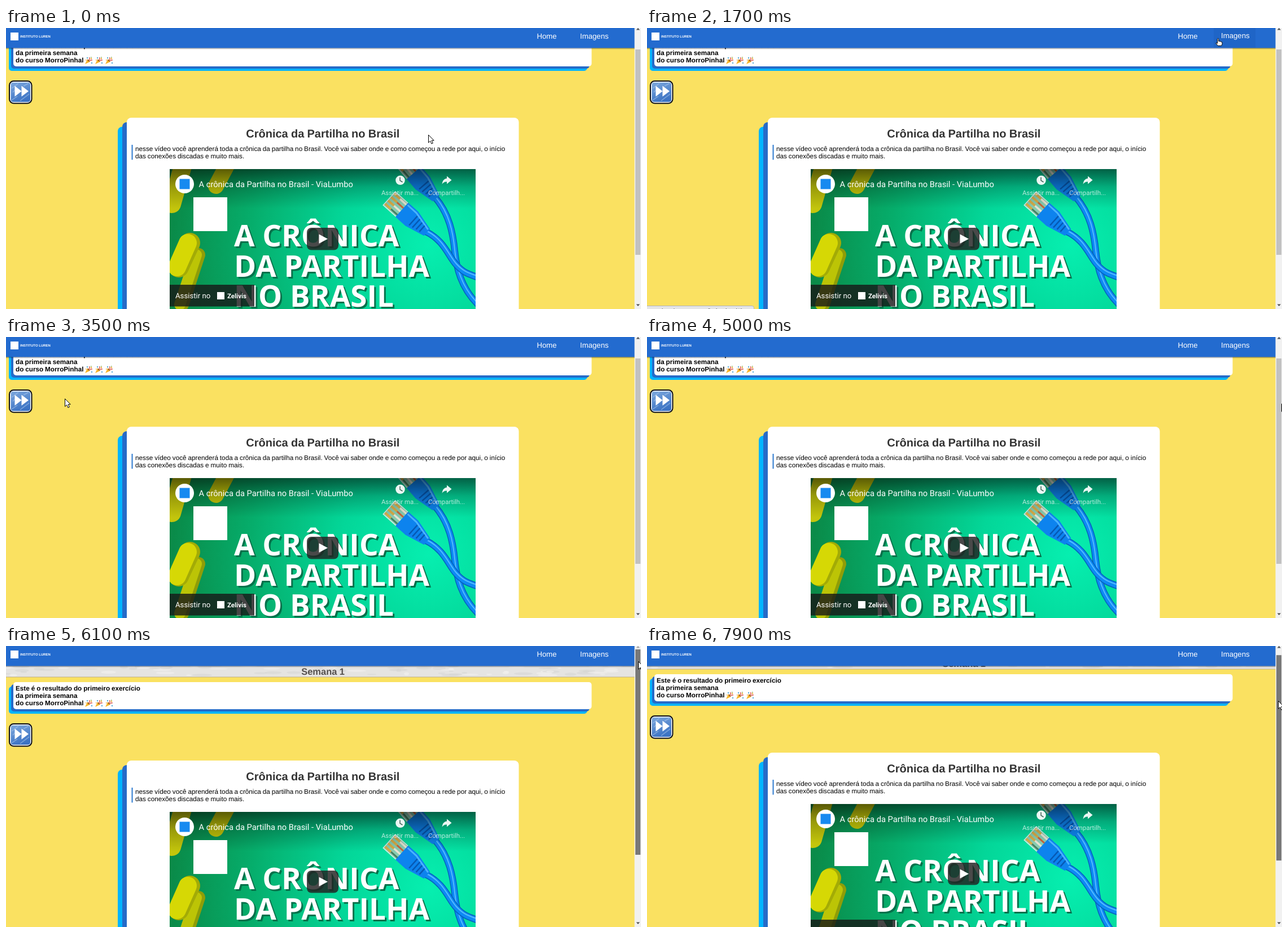
Recreate the animation shown at these times as an HTML page. Size 1125 by 498 pixels, loop 8 s.

```html
<!DOCTYPE html>
<html lang="pt-BR">
<head>
<meta charset="utf-8">
<title>Semana 1</title>
<style>
  html, body { margin: 0; width: 100%; height: 100%; overflow: hidden; }
  svg { display: block; width: 1125px; height: 498px; }
  text { text-rendering: geometricPrecision; font-family: "Liberation Sans", Arial, sans-serif; font-size: 11.72px; word-spacing: -.32px; white-space: pre; }
  .b { font-weight: 700; }
  .mid { text-anchor: middle; }
  .nav { font-size: 13.2px; fill: #fff; }
  .yt { font-family: Roboto, sans-serif; fill: #fff; word-spacing: 0; }
  .big { font: 700 53px "Open Sans", "Noto Sans", sans-serif; word-spacing: 0; }
</style>
</head>
<body>
<svg viewBox="0 0 1125 498">
  <defs>
    <linearGradient id="shade" x2="0" y2="1">
      <stop stop-opacity=".55"/><stop offset=".45" stop-opacity=".22"/><stop offset="1" stop-opacity="0"/>
    </linearGradient>
    <linearGradient id="under" x2="0" y2="1">
      <stop stop-opacity=".4"/><stop offset="1" stop-opacity="0"/>
    </linearGradient>
    <linearGradient id="key" x2=".4" y2="1">
      <stop stop-color="#7da8dd"/><stop offset="1" stop-color="#3d74c4"/>
    </linearGradient>
    <radialGradient id="green" gradientUnits="userSpaceOnUse" cx="750" cy="385" r="460">
      <stop stop-color="#06efb0"/><stop offset=".35" stop-color="#03d698"/><stop offset=".7" stop-color="#06ac6a"/><stop offset="1" stop-color="#0a8a48"/>
    </radialGradient>
    <clipPath id="frame"><rect x="290" y="250" width="542" height="305"/></clipPath>
    <g id="popper">
      <path d="M0 13 4 4.500 8.500 9Z" fill="#f6b62c"/>
      <path d="M4 4.500Q8 5 8.500 9Q5 8 4 4.500Z" fill="#9a5a1e"/>
      <path d="M7 6Q9 4 7.500 1M8.500 7.500Q10 5 13 6" fill="none" stroke="#d9483b" stroke-width="1.300"/>
      <path d="M3 1h2v2h-2zM11 10h2v2h-2z" fill="#4aa5d8"/>
      <path d="M10 2h2v2h-2zM1 5h1.500v1.500h-1.500z" fill="#efa72e"/>
      <path d="M10 .3h1.500v1.300h-1.500z" fill="#69a844"/>
    </g>
    <g id="plug">
      <path d="M0-16H36V16H0Z" fill="#9fc8b4" fill-opacity=".85" stroke="#dcefe5" stroke-width="1.500"/>
      <path d="M1-12H15M1-4H15M1 4H15M1 12H15" stroke="#d9ab45" stroke-width="4"/>
      <path d="M15-12H34M15 4H34" stroke="#e7e2d2" stroke-width="3.500"/>
      <path d="M15-4H34" stroke="#c8643a" stroke-width="3"/>
      <path d="M15 12H34" stroke="#477f62" stroke-width="3"/>
      <path d="M30-17H54L90-8V8L54 17H30Z" fill="#0d83ee"/>
      <path d="M32-13H53L88-5" fill="none" stroke="#4ab2ff" stroke-width="3"/>
      <path d="M58-10V12M65-9V11M72-7V9M79-6V8" stroke="#0759b4" stroke-width="2.500"/>
    </g>
    <path id="arrow" d="M.5.5V14.200L3.700 11.200 5.900 16.200 8.300 15.100 6.100 10.300H10.200Z" fill="#fff" stroke="#000"/>
    <path id="hand" d="M3.500 8V1.800Q3.500.5 4.600.5T5.700 1.800V5.500Q7.500 4.400 8 6 9.700 5 10.200 6.700 12 6.200 12 8V10.500L10.700 13.500H4.600L.8 9.200Q.5 7.300 3.500 9.300Z" fill="#fff" stroke="#000"/>
  </defs>

  <rect width="1114" height="498" fill="#fae161"/>

  <g id="page">
    <rect y="-60" width="1114" height="71" fill="#e5e4e2"/>
    <g id="grain"></g>
    <path d="M0 11H1114" stroke="#bfae86"/>
    <text class="b mid" x="561.500" y="7" style="font-size:16.500px" fill="#55504e">Semana 1</text>

    <g id="note"></g>
    <text class="b" x="17" y="34.900">Este é o resultado do primeiro exercício</text>
    <text class="b" x="17" y="48.100">da primeira semana</text>
    <text class="b" x="17" y="61.300">do curso MorroPinhal</text>
    <use href="#popper" x="140" y="51"/><use href="#popper" x="158" y="51"/><use href="#popper" x="176" y="51"/>

    <rect x="6" y="94" width="39.500" height="39.500" rx="7.500" fill="#fff" stroke="#080c18" stroke-width="2"/>
    <rect x="8.500" y="96.500" width="34.500" height="34.500" rx="4" fill="url(#key)"/>
    <path d="M10 107 22 98M10 128 20 121M25 129 41 117M31 103 40 98M12 114 17 109" stroke="#a9c7ec" stroke-opacity=".6" stroke-width="1.500"/>
    <path d="M15.500 102.500V121.500L27.500 112ZM27.500 102.500V121.500L40 112Z" fill="#fff"/>

    <g id="card"></g>
    <text class="b mid" x="561.300" y="194" style="font-size:20px" fill="#333">Crônica da Partilha no Brasil</text>
    <rect x="222.400" y="207" width="2.300" height="26.500" fill="#4488d4"/>
    <text x="229" y="217.800">nesse vídeo você aprenderá toda a crônica da partilha no Brasil. Você vai saber onde e como começou a rede por aqui, o início</text>
    <text x="229" y="231">das conexões discadas e muito mais.</text>

    <g clip-path="url(#frame)">
      <rect x="290" y="250" width="542" height="305" fill="url(#green)"/>
      <g fill="none" stroke-linecap="round">
        <path d="M316 235 294 312" stroke="#c3c50c" stroke-width="32"/>
        <path d="M396 235 372 280" stroke="#c9cc0a" stroke-width="28"/>
        <path d="M341 402 312 490" stroke="#8f9d08" stroke-width="24"/>
        <path d="M337 402 308 490" stroke="#bcc406" stroke-width="20"/>
        <path d="M326 381 306 424" stroke="#a3ab06" stroke-width="36"/>
        <path d="M322 381 303 424" stroke="#d6d805" stroke-width="32"/>
      </g>
      <g id="cables" fill="none"></g>
      <use href="#plug" transform="translate(703 234) rotate(49)"/>
      <use href="#plug" transform="translate(679 302) rotate(42)"/>
      <g id="headline"></g>
      <rect x="290" y="250" width="542" height="70" fill="url(#shade)"/>
      <rect x="332" y="300" width="60" height="60" fill="#fff"/>

      <circle cx="316.500" cy="276.500" r="16.500" fill="#fff"/>
      <rect x="307.500" y="267.500" width="18" height="18" fill="#178af0"/>
      <text class="yt" x="341.500" y="282" style="font-size:14.700px">A crônica da Partilha no Brasil - ViaLumbo</text>
      <circle cx="698.500" cy="269.800" r="8.300" fill="#fff" fill-opacity=".92"/>
      <path d="M698 264.500V270.300L702.500 273" fill="none" stroke="#41635a" stroke-width="1.500"/>
      <path d="M781 262.500 789.500 269.500 781 276.500V272.500Q775.500 272 772.500 277 773.500 267.500 781 266.500Z" fill="#fff" fill-opacity=".92"/>
      <g fill-opacity=".72">
        <text class="yt mid" x="698" y="296" style="font-size:11.400px">Assistir ma...</text>
        <text class="yt mid" x="780.500" y="296" style="font-size:11.400px">Compartilh...</text>
      </g>
      <rect id="play" x="533" y="354" width="56" height="39.500" rx="8"/>
      <path d="M554.500 365.500V382L570 373.800Z" fill="#fff"/>
      <rect x="290" y="455" width="150" height="38.500" fill="#171717" fill-opacity=".8"/>
      <text class="yt" x="300" y="479" style="font-size:13.200px">Assistir no</text>
      <rect x="374" y="468" width="13" height="13" fill="#fff"/>
      <text class="yt b" x="392" y="479" style="font-size:11.500px">Zelivis</text>
    </g>
  </g>

  <rect width="1114" height="35.500" fill="#236bcf"/>
  <rect y="35.500" width="1114" height="2.500" fill="url(#under)"/>
  <rect x="8" y="8" width="14" height="14" fill="#fff"/>
  <text class="b" x="25" y="17" style="font-size:6px;word-spacing:0" fill="#fff">INSTITUTO LUREN</text>
  <rect id="glow" x="1004" width="74" height="35" fill="#1a58b4" fill-opacity=".3"/>
  <text class="nav" x="940.500" y="19">Home</text>
  <text class="nav" x="1017" y="19" id="link">Imagens</text>

  <g id="status">
    <path d="M-1 492.500H186Q189.500 492.500 189.500 496V499H-1Z" fill="#e4e5e8" stroke="#b4b5b8"/>
    <text x="4" y="505" fill="#444" style="font-size:11px">arquivos/semana-um/index.html#img</text>
  </g>

  <rect x="1113.500" width="11.500" height="498" fill="#f1f1f1"/>
  <path id="up" d="M1116.500 3.500 1119.700 0 1123 3.500Z"/>
  <path d="M1116.500 489.500 1119.700 493 1123 489.500Z" fill="#505050"/>
  <rect id="thumb" x="1115" width="9" height="364"/>
  <use id="cursor"/>
</svg>

<script>
const $ = id => document.getElementById(id);
const LOOP = 8000;

// white panel with two stepped colour shadows
function panel(id, x, y, w, h, r, d) {
  $(id).innerHTML = [['#00b4ff', 2], ['#266ac8', 1], ['#fff', 0]].map(([c, k]) =>
    `<rect x="${x - k * d}" y="${y + k * d}" width="${w}" height="${h}" rx="${r}" fill="${c}"/>`).join('');
}
panel('note', 13, 20, 1024.5, 48, 5, 4);
panel('card', 214, 159, 694.5, 560, 8, 8);

$('headline').innerHTML = [['#05714b', 3], ['#fff', 0]].map(([c, d]) =>
  ['A CRÔNICA', 'DA PARTILHA', 'NO BRASIL'].map((s, i) =>
    `<text class="big" x="${404 + d}" y="${387 + i * 53.7 + d}" fill="${c}">${s}</text>`).join('')).join('');

$('cables').innerHTML = ['M760 300C786 330 792 365 795 395S806 460 836 490', 'M744 361C776 376 784 405 798 420S820 436 836 442'].map(d =>
  [['#0660bd', 12, 0], ['#0d8af4', 9, 0], ['#56baff', 2, -2]].map(([c, w, y]) =>
    `<path d="${d}" stroke="${c}" stroke-width="${w}" transform="translate(0 ${y})"/>`).join('')).join('');

let seed = 7;
const rnd = () => (seed = seed * 16807 % 2147483647) / 2147483647;
$('grain').innerHTML = Array.from({ length: 130 }, () =>
  `<ellipse cx="${rnd() * 1114}" cy="${rnd() * 36 - 28}" rx="${4 + rnd() * 14}" ry="${1 + rnd() * 2}" fill="${rnd() < .5 ? '#f4f3f1' : '#d6d5d3'}" opacity=".55"/>`).join('');

const path = [ // time, x, y of the pointer
  [0, 748, 189], [100, 748, 189], [300, 770, 270], [500, 790, 330], [700, 900, 300],
  [900, 1116, 200], [1100, 1117, 120], [1300, 1080, 60], [1500, 1030, 22],
  [1700, 1007, 18], [1900, 929, 14], [2400, 1024, 23], [2900, 1024, 23],
  [3300, 300, 90], [3500, 104, 109], [3700, 24, 114], [3800, -30, 114],
  [3900, 1095, 89], [4000, 1098, 114], [4100, 1098, 114], [4300, 1124, 118],
  [5000, 1124, 118], [5500, 1121, 66], [5900, 1121, 62], [6100, 1120, 27],
  [6400, 1119, 14], [6700, 1119, 14], [7000, 1063, 3], [7400, 1118, 87],
  [7700, 1118, 87], [7900, 1118, 97]
];
const scroll = [[0, 0], [5800, 0], [5900, 2.5], [6000, 20], [6100, 44], [7700, 44], [7900, 30]];
const grip = [[0, '#c1c1c1'], [900, '#a8a8a8'], [1200, '#c1c1c1'], [5100, '#a8a8a8'], [5700, '#787878'],
  [6800, '#c1c1c1'], [7300, '#a8a8a8'], [7400, '#787878']];

function at(keys, t) {
  const i = keys.findLastIndex(k => k[0] <= t), a = keys[i], b = keys[i + 1] || a;
  const f = b === a ? 0 : (t - a[0]) / (b[0] - a[0]);
  return a.slice(1).map((v, j) => v + (b[j + 1] - v) * f);
}
const show = (id, on) => $(id).setAttribute('visibility', on ? 'visible' : 'hidden');
const set = (id, attrs) => { for (const k in attrs) $(id).setAttribute(k, attrs[k]); };

function draw(now) {
  const t = Math.floor(now % LOOP / 100) * 100;
  const within = (a, b) => t >= a && t <= b;
  const [x, y] = at(path, t), [dy] = at(scroll, t);
  const video = within(300, 600), link = within(1500, 1700), button = within(3600, 3700);

  set('page', { transform: `translate(0 ${dy})` });
  set('thumb', { y: 38 - dy * .727, fill: grip.findLast(k => k[0] <= t)[1] });
  set('up', { fill: dy === 44 ? '#a3a3a3' : '#505050' });
  set('play', { fill: video ? '#f00' : '#212121', 'fill-opacity': video ? 1 : .82 });
  set('link', { y: link ? 18 : 19 });
  show('glow', link);
  show('status', link || button);
  set('cursor', { href: video || link || button || t === 1800 ? '#hand' : '#arrow', transform: `translate(${x} ${y})` });
  requestAnimationFrame(draw);
}
draw(0);
</script>
</body>
</html>
```
